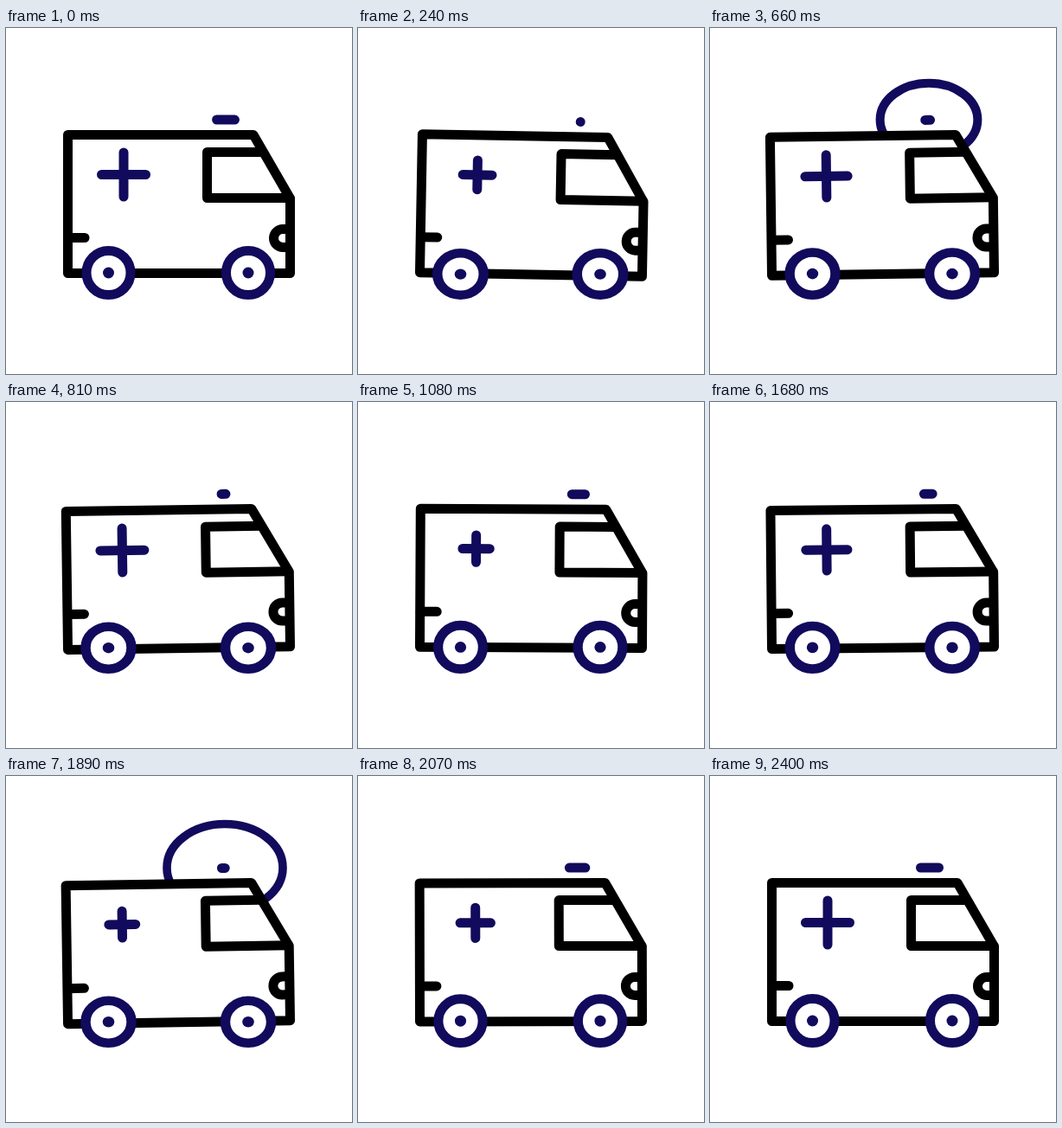
An HTML page that plays this animation: 400 by 400 pixels, repeating every 4.46 s.

```html
<!DOCTYPE html>
<html lang="en">
<head>
<meta charset="utf-8">
<title>Ambulance</title>
<style>
/* sway: -1..1, arm: cross line length, halo: outer radius of the siren ring */
@property --sway { syntax: "<number>"; inherits: true; initial-value: 0; }
@property --arm { syntax: "<number>"; inherits: true; initial-value: 51; }
@property --halo { syntax: "<number>"; inherits: true; initial-value: 0; }

html, body { margin: 0; width: 100%; height: 100%; overflow: hidden; background: #fff; }

svg {
  --navy: #120a5c;
  --tilt: max(var(--sway), -1 * var(--sway));
  display: block;
  width: 100%;
  height: 100%;
  fill: none;
  stroke-width: 11px;
  stroke-linecap: round;
  stroke-linejoin: round;
  animation: sway 4460ms linear infinite, arm 4460ms linear infinite, halo 4460ms linear infinite;
}

.halo {
  --w: calc(12.5 - .04 * var(--halo));
  stroke: var(--navy);
  stroke-width: calc(var(--w) * 1px);
  rx: calc(max(0, var(--halo) - var(--w) / 2) * 1px);
  ry: calc(max(0, .77 * var(--halo) - var(--w) / 2) * 1px);
}

/* the van leans over whichever wheel carries the load */
.front { transform-origin: 118px 283px; transform: rotate(calc(max(0, var(--sway)) * 1.05deg)); }
.rear { transform-origin: 280px 283px; transform: rotate(calc(min(0, var(--sway)) * 1.05deg)); }

.body { stroke: #000; }
.body .shell { fill: #fff; }
.mark { fill: var(--navy); }

.light {
  --len: calc(21 * (1 - var(--tilt)) + 11);
  x: calc((254 - var(--len) / 2) * 1px);
  width: calc(var(--len) * 1px);
}
.across, .down { --len: calc(var(--arm) + 11); }
.across {
  x: calc((136 - var(--len) / 2) * 1px);
  width: calc(var(--len) * 1px);
}
.down {
  y: calc((169.5 - var(--len) / 2) * 1px);
  height: calc(var(--len) * 1px);
}

.wheel {
  transform-origin: 0 314px;
  transform: scale(calc(1 + .05 * var(--tilt)), calc(1 - .05 * var(--tilt)));
}
.wheel .tyre { fill: #fff; stroke: var(--navy); }
.wheel .hub { fill: var(--navy); }

@keyframes sway {
  0% { --sway: 0; animation-timing-function: cubic-bezier(.39, .58, .57, 1); }
  5.38% { --sway: 1; animation-timing-function: cubic-bezier(.43, 0, .61, .42); }
  12.1% { --sway: 0; }
  14.8% { --sway: -.72; animation-timing-function: ease-out; }
  16.1% { --sway: -.85; animation-timing-function: cubic-bezier(.43, 0, .61, .42); }
  22.6% { --sway: 0; }
  24.22% { --sway: .27; animation-timing-function: ease-out; }
  26.9% { --sway: 1; animation-timing-function: ease-in-out; }
  31.6% { --sway: .4; }
  35.8% { --sway: 0; animation-timing-function: cubic-bezier(.39, .58, .57, 1); }
  40.4% { --sway: -.86; animation-timing-function: ease-in; }
  42.38% { --sway: -.82; animation-timing-function: ease-in-out; }
  48.4% { --sway: .08; animation-timing-function: ease-in-out; }
  53.8%, 100% { --sway: 0; }
}

@keyframes arm {
  0%, 17.94%, 35.87% { --arm: 51; animation-timing-function: cubic-bezier(.37, 0, .63, 1); }
  7.53%, 25.47%, 43.4% { --arm: 30; animation-timing-function: cubic-bezier(.37, 0, .63, 1); }
  16.5%, 34.44%, 52.4%, 100% { --arm: 51; }
}

@keyframes halo {
  0%, 12.24%, 26.91%, 39.15% { --halo: 0; animation-timing-function: cubic-bezier(.333, .6, .667, .933); }
  5.34%, 17.58%, 32.24%, 44.49% { --halo: 89.9; animation-timing-function: step-start; }
  5.35%, 17.59%, 32.25%, 44.5%, 100% { --halo: 0; }
}
</style>
</head>
<body>
<svg viewBox="0 0 400 400">
  <ellipse class="halo" cx="253" cy="106"/>
  <g class="front">
    <g class="rear">
      <g class="body">
        <path class="shell" d="M71.5 123.5H286L328.5 197V283.5H71.5Z"/>
        <path d="M297 143.5H232.5V196.5H328"/>
        <path d="M72 242.5H91"/>
        <path d="M323 232.5H320A10.5 10.5 0 0 0 320 253.5H323"/>
      </g>
      <g class="mark">
        <rect class="light" y="100.5" height="11" rx="5.5"/>
        <rect class="across" y="164" height="11" rx="5.5"/>
        <rect class="down" x="130.5" width="11" rx="5.5"/>
      </g>
    </g>
  </g>
  <g transform="translate(118.5 0)">
    <g class="wheel">
      <circle class="tyre" cy="283" r="25.5"/>
      <circle class="hub" cy="283" r="6.5"/>
    </g>
  </g>
  <g transform="translate(280 0)">
    <g class="wheel">
      <circle class="tyre" cy="283" r="25.5"/>
      <circle class="hub" cy="283" r="6.5"/>
    </g>
  </g>
</svg>
</body>
</html>
```
